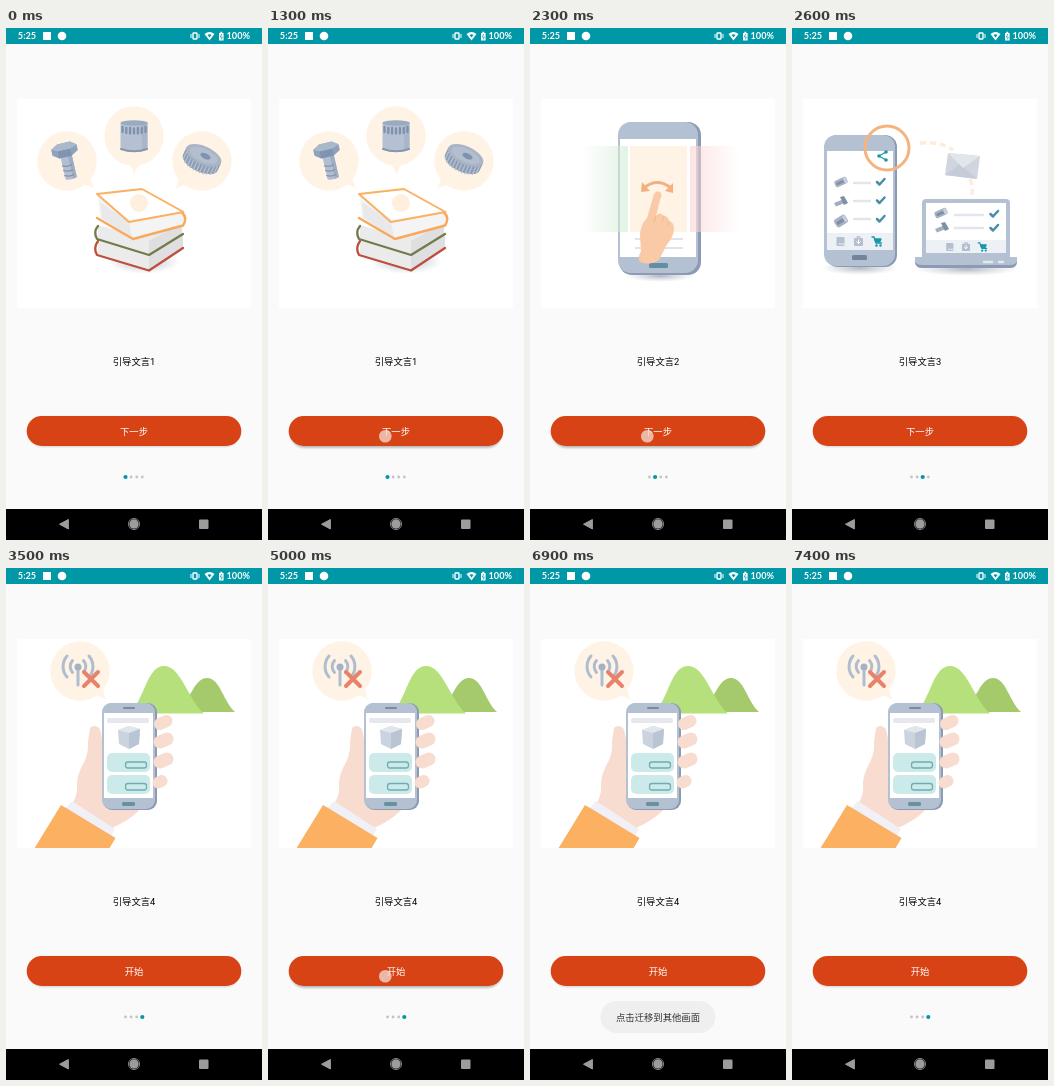
An HTML page for the animation above (7.5 s loop, 256 px wide and 512 px high).

```html
<!DOCTYPE html>
<html lang="zh-CN">
<head>
<meta charset="utf-8">
<title>引导页</title>
<style>
html, body { margin: 0; width: 100%; height: 100%; overflow: hidden; background: #fafafa; }
svg { display: block; width: 256px; height: 512px; }
text { font: 9.33px Roboto, "Noto Sans CJK SC", "Noto Sans CJK", sans-serif; text-anchor: middle; }
.status { font: 700 9.2px Lato, sans-serif; fill: #fff; }
#label { font-weight: 500; }
.cream { fill: #fff3e6; }
.body { fill: #b4c1d3; }
.side { fill: #8c9bb3; }
.skin { fill: #f7dccf; }
.line { fill: none; stroke-linecap: round; stroke-linejoin: round; }
</style>
</head>
<body>
<svg viewBox="0 0 256 512">
<defs>
  <linearGradient id="green"><stop stop-color="#d9eedb" stop-opacity="0"/><stop offset="1" stop-color="#d3ecd5" stop-opacity=".65"/></linearGradient>
  <linearGradient id="red"><stop stop-color="#fbd5d3" stop-opacity=".65"/><stop offset="1" stop-color="#fbdcda" stop-opacity="0"/></linearGradient>
  <radialGradient id="soft"><stop stop-color="#8f98a8" stop-opacity=".7"/><stop offset="1" stop-color="#b0b7c3" stop-opacity="0"/></radialGradient>
  <filter id="blur" x="-10%" y="-50%" width="120%" height="200%"><feGaussianBlur stdDeviation="1.2"/></filter>
  <path id="check" class="line" d="M-3.5 0L-1 2.5L4-3" stroke="#4a8cab" stroke-width="2.5"/>
  <g id="cart" class="line" stroke="#1798a8" stroke-width="1.3">
    <path d="M-5-4.5h2l2 6h5.5"/><path d="M-2.5-2.5h6.500l-1.300 3h-4z" fill="#1798a8"/>
    <circle cx="-.5" cy="4" r=".6"/><circle cx="3.500" cy="4" r=".6"/>
  </g>
  <g id="tabs" fill="#b4bfd0">
    <rect x="-22" y="-4.5" width="8" height="9" rx="1"/><path d="M-20 2.5h6" stroke="#edf0f5"/>
    <rect x="-4.5" y="-3.5" width="9" height="8" rx="1"/><path d="M-2-4.5h4" stroke="#b4bfd0" stroke-width="1.5"/>
    <path d="M0-2v4M-2 0L0 2L2 0" fill="none" stroke="#fff"/>
    <use href="#cart" x="18.5"/>
  </g>
  <g id="part">
    <rect x="-6.5" y="-3.5" width="13" height="7" rx="2" fill="#a6b2c4"/>
    <rect x="-5" y="-1" width="9" height="2.5" rx="1" fill="#7e8fa7"/>
    <ellipse cx="4.5" cy="0" rx="1.7" ry="3" fill="#c7d0dc"/>
  </g>
  <g id="screw"><path d="M-7 2L3-2L5 1.500L-5 5.500z" fill="#a3afc1"/><path d="M-1-4L3-5L7 2L3 4z" fill="#7e8fa7"/></g>
  <rect id="card" width="234" height="209" x="11" y="71" fill="#fff"/>
  <g id="bubble" class="cream"><circle r="29.7"/><path d="M-7 25Q0 34 0 39Q2 34 7 25z"/></g>
  <clipPath id="cardClip"><use href="#card"/></clipPath>
</defs>

<rect width="256" height="512" fill="#fafafa"/>

<g id="pages">
  <g>
    <use href="#card"/>
    <use href="#bubble" transform="translate(61 133) rotate(-44)"/>
    <use href="#bubble" transform="translate(128 108)"/>
    <use href="#bubble" transform="translate(196 133) rotate(44)"/>
    <g transform="translate(58.5 122) rotate(-13)">
      <path d="M-5.500 4h11.500v25q-6 2.500-11.500 0z" fill="#b3bfd0"/><path d="M2 5h4v24l-4 1z" fill="#9dadc2"/>
      <path class="line" d="M-5.500 15q5 2.500 9 1M-5.500 20q5 2.500 9 1M-5.500 25q5 2.500 9 1" stroke="#8194ad" stroke-width="1.3"/>
      <path d="M-13-3L-6-7H7L13-3V3L6 7H-7L-13 3z" fill="#8fa2bb"/>
      <path d="M-13-3L-6-7H7L13-3L6 0H-7z" fill="#a9b8cb"/><path d="M-7 0H6V7H-7z" fill="#7f94b1"/>
    </g>
    <path d="M114.500 95.500q13.500-5 27 0v26q-13.500 5-27 0z" fill="#b5c1d2"/>
    <path d="M136 94h5.500v27.500l-5.500 2z" fill="#a9b6c9"/>
    <ellipse cx="128" cy="95" rx="13.500" ry="2.700" fill="#9aabc1"/>
    <path class="line" d="M116.500 99v5M120.300 100v5M124.100 100v5.500M128 100.500v5M131.900 100v5.500M135.700 100v5M139.500 99v5" stroke="#7d91ac" stroke-width="2.300"/>
    <path class="line" d="M115 121q13 4.500 26 0" stroke="#8597b0" stroke-width="2"/>
    <g transform="translate(196 131) rotate(25)">
      <path d="M-19-4v8a19 9 0 0 0 38 0v-8z" fill="#8c9db5"/>
      <path d="M-17 0v8M-14 2v9M-10.500 3.500v9M-7 4.500v9M-3.500 5v9M0 5v9M3.500 5v9M7 4.500v9M10.500 3.500v9M14 2v9M17 0v8" stroke="#b9c4d2" stroke-width="1.200"/>
      <ellipse cy="-4" rx="19" ry="9" fill="#a9b5c6"/><ellipse cy="-4" rx="15" ry="6.500" fill="#b3bfce"/>
      <ellipse cx="2" cy="-4" rx="5.500" ry="2.700" fill="#7f93ad"/>
    </g>
    <ellipse cx="138" cy="234" rx="36" ry="12" fill="url(#soft)"/>
    <path d="M92 212L143 227L177 206V220L143 242L92 227z" fill="#ebebec"/>
    <path d="M143 227L177 206V220L143 242z" fill="#dfdfe2"/>
    <path d="M92 197L130 208L176 196V206L143 226L92 211z" fill="#ebebec"/>
    <path d="M143 213L176 194V206L143 226z" fill="#dfdfe2"/>
    <g class="line" stroke-width="2.3">
      <path d="M92 213Q87 220 91 227L143 242.500L177 220" stroke="#bd4f3d"/>
      <path d="M92 198Q87 204 91 211L143 227L177 206" stroke="#737a4c"/>
    </g>
    <path d="M92 168L124 192L178 184V197L127 211L94 190z" fill="#f4f4f5"/>
    <path d="M94 174L123 194L126 210L96 190z" fill="#e9e9eb"/>
    <path class="line" d="M91 190L127 211L177 197.500Q182 190 176 184.500" stroke="#f8a95c" stroke-width="2.500"/>
    <path class="line" d="M91 166L136 161L177.500 184L123 194z" fill="#fbb062" stroke="#fbb062" stroke-width="2"/>
    <circle cx="133" cy="175" r="9" fill="#fff0dd"/>
    <text x="128" y="337">引导文言1</text>
  </g>

  <g>
    <use href="#card"/>
    <g transform="translate(-2)">
      <ellipse cx="132" cy="248" rx="34" ry="6" fill="url(#soft)"/>
      <rect class="side" x="91" y="94" width="82" height="153" rx="13"/>
      <rect class="body" x="90" y="94" width="80" height="151" rx="13"/>
      <rect x="92" y="111" width="76" height="118" fill="#fff"/>
      <rect x="121" y="235" width="19" height="5" rx="1.5" fill="#628fa0"/>
      <rect class="cream" x="102" y="118" width="57" height="86"/>
      <rect x="53" y="118" width="47" height="86" fill="url(#green)"/>
      <rect x="162" y="118" width="50" height="86" fill="url(#red)"/>
      <path d="M107 211h48M107 220h48" stroke="#e2e3ea" stroke-width="2"/>
      <path class="line" d="M116 160Q129 149 143 160" stroke="#f3b083" stroke-width="3"/>
      <path d="M113 164L114 154L122 163zM145 165L137 163L145 155z" fill="#f3b083"/>
      <path d="M126 166Q129 161 133 165Q134 167 132 172L128 188Q132 183 136 188Q140 188 141 193Q146 194 146 201Q146 208 138 218L131 232Q122 238 112 234Q109 230 113 223L112 208Q112 197 119 190z" fill="#fac9a6"/>
      <path class="line" d="M128 188L126 194M136 188L134 193M141 193L140 197" stroke="#f4b78f"/>
    </g>
    <text x="128" y="337">引导文言2</text>
  </g>

  <g>
    <use href="#card"/>
    <ellipse cx="68" cy="240" rx="38" ry="7" fill="url(#soft)"/>
    <ellipse cx="174" cy="241" rx="52" ry="7" fill="url(#soft)"/>
    <rect class="side" x="34" y="107" width="71" height="132" rx="12"/>
    <rect class="body" x="32" y="107" width="71" height="131" rx="12"/>
    <rect x="35" y="123" width="66" height="99" fill="#fff"/>
    <rect x="60" y="227" width="15" height="5" rx="1.5" fill="#72839b"/>
    <rect x="35" y="205" width="66" height="17" fill="#edf0f5"/>
    <use href="#tabs" x="66.5" y="213.500"/>
    <path class="line" d="M62 155h16M62 173h16M62 191h16" stroke="#e4e5ec" stroke-width="2.5"/>
    <use href="#part" transform="translate(49 154) rotate(-24)"/>
    <use href="#screw" x="49" y="173"/>
    <use href="#part" transform="translate(49 193) rotate(-32) scale(1 1.300)"/>
    <use href="#check" x="88.5" y="154"/><use href="#check" x="88.5" y="172.500"/><use href="#check" x="88.5" y="191"/>
    <circle cx="95" cy="120" r="22" fill="none" stroke="#f5b37d" stroke-width="3"/>
    <path class="line" d="M94 124L87 128L94 132" stroke="#1798a8" stroke-width="1.200"/>
    <g fill="#1798a8"><circle cx="94" cy="124" r="1.800"/><circle cx="87" cy="128" r="1.800"/><circle cx="94" cy="132" r="1.800"/></g>
    <path d="M128 115Q148 113 161 122M178 151Q181 159 180 167" fill="none" stroke="#fdebdb" stroke-width="3.500" stroke-dasharray="6 4"/>
    <path d="M156 125L188 128L185 151L153 147z" fill="#d0d5de"/>
    <path d="M153 147L168 136L185 151z" fill="#c6ccd7"/>
    <path d="M156 125L188 128L171 140z" fill="#e2e5eb"/>
    <rect class="body" x="130" y="171" width="88" height="61" rx="4"/>
    <rect x="134" y="175" width="80" height="50" fill="#fff"/>
    <rect x="134" y="212" width="80" height="13" fill="#edf0f5"/>
    <use href="#tabs" transform="translate(174 219) scale(.9)"/>
    <path class="line" d="M163 187h28M163 200h28" stroke="#e4e5ec" stroke-width="2.5"/>
    <use href="#part" transform="translate(149 185) rotate(-24)"/>
    <use href="#screw" x="150" y="199"/>
    <use href="#check" x="202" y="186"/><use href="#check" x="202" y="200"/>
    <path class="side" d="M123 232h102v3q-1 5-7 5h-88q-6 0-7-5z"/>
    <path class="body" d="M123 229h102v4q-1 4-7 4h-88q-6 0-7-4z"/>
    <path class="line" d="M192 234h8M207 234h4" stroke="#e4e9f0" stroke-width="2.5"/>
    <text x="128" y="337">引导文言3</text>
  </g>

  <g>
    <use href="#card"/>
    <g clip-path="url(#cardClip)">
      <path d="M172 144C184 133 188 110 201 110S217 133 229 144z" fill="#a4ca6c"/>
      <path d="M124 145.500C139 130 141 98 158 98S181 130 198 145.500z" fill="#b6e07b"/>
      <use href="#bubble" transform="translate(74 103) rotate(-42)"/>
      <g class="line" stroke="#b0bdcf" stroke-width="3">
        <path d="M72 100v17"/>
        <path d="M66.500 92.500a9 9 0 0 0 0 12M77.500 92.500a9 9 0 0 1 0 12M61 88a16 16 0 0 0 0 21M83 88a16 16 0 0 1 0 21"/>
      </g>
      <circle cx="72" cy="99" r="3.500" fill="#a3b2c6"/>
      <path class="line" d="M78 104L92 118M92 104L78 118" stroke="#e8826b" stroke-width="4"/>
      <path class="skin" d="M84 160Q88 156 93 160Q96 164 97 184L104 230L135 240Q126 251 106 260L66 236Q72 228 71 216Q71 208 76 198Q83 186 82 174Z"/>
      <rect class="side" x="97" y="135" width="54" height="107" rx="9"/>
      <rect class="body" x="96" y="135" width="53" height="106" rx="9"/>
      <rect x="98" y="145" width="49" height="85" fill="#fff"/>
      <rect x="117" y="139" width="12" height="2" rx="1" fill="#788ba2"/>
      <rect x="116" y="234" width="13" height="4" rx="1.5" fill="#67919b"/>
      <rect x="101" y="150" width="42" height="5" rx="2" fill="#e7e8ee"/>
      <path d="M112 162L123 158L134 161L133 176L123 181L113 176z" fill="#cbd3df"/>
      <path d="M112 162L123 158L134 161L123 165z" fill="#e1e6ed"/><path d="M123 165L134 161L133 176L123 181z" fill="#bac5d3"/>
      <rect x="101" y="185" width="43" height="19" rx="5" fill="#cdeaea"/>
      <rect x="101" y="207" width="43" height="19" rx="5" fill="#cdeaea"/>
      <g fill="none" stroke="#70adb0" stroke-width="1.300"><rect x="119.500" y="194" width="21" height="6" rx="2.5"/><rect x="119.500" y="215.500" width="21" height="6.500" rx="2.5"/></g>
      <g class="line" stroke="#f7dccf">
        <path d="M154 156L160.500 153" stroke-width="12"/><path d="M154 174L161 171" stroke-width="13"/>
        <path d="M154 194L161 191" stroke-width="13"/><path d="M152.500 214.500L155.500 213" stroke-width="12"/>
      </g>
      <path d="M66 233L109 261L104 270L59 241z" fill="#f2f0f7"/>
      <path d="M59 240L104 268" stroke="#dedfe9" stroke-width="1.5"/>
      <path d="M55 237L109.500 270L103 281H28z" fill="#fbb062"/>
    </g>
    <text x="128" y="337">引导文言4</text>
  </g>
</g>

<rect id="shade" x="22" y="388" width="212" height="30" rx="15" filter="url(#blur)"/>
<rect x="20.700" y="388" width="214.600" height="30" rx="15" fill="#d84315"/>
<text id="label" x="128" y="406.700" fill="#fff"></text>
<g id="dots"></g>
<g id="toast">
  <rect x="70.500" y="433" width="115" height="32" rx="16" fill="#eeeeef"/>
  <text x="128" y="452.700" fill="#222">点击迁移到其他画面</text>
</g>
<circle id="touch" cx="117.300" cy="408.300" r="6.300" fill="#f3dfd6"/>

<rect width="256" height="16" fill="#0097a7"/>
<text class="status" x="21" y="11.300">5:25</text>
<rect x="37" y="4" width="8" height="8" fill="#fff"/>
<circle cx="56" cy="8" r="4.300" fill="#fff"/>
<g fill="none" stroke="#fff"><rect x="187" y="5" width="4" height="6" rx=".7" stroke-width="1.400"/><path d="M185 6v4M193 6v4"/></g>
<path d="M198.500 6Q203.500 2 208.500 6L203.500 12.500z" fill="#fff"/>
<path d="M201.500 7Q203.500 5.500 205.500 7L203.500 9.500z" fill="#0097a7"/>
<path d="M213 5h1.300V3.700h2V5h1.300v7.500H213z" fill="#fff"/><path d="M215.700 6L214.300 9h2l-1 2.500" fill="none" stroke="#0097a7" stroke-width=".7"/>
<text class="status" x="232.300" y="11.300">100%</text>

<rect y="481" width="256" height="31" fill="#000"/>
<g fill="#9c9c9c">
  <path d="M62.400 491.500V501L53.500 496.200z" stroke="#9c9c9c" stroke-linejoin="round"/>
  <circle cx="128" cy="496" r="4.700"/><circle cx="128" cy="496" r="5.600" fill="none" stroke="#9c9c9c" stroke-width=".8"/>
  <rect x="193" y="491.500" width="9.500" height="9.500" rx="1"/>
</g>
</svg>
<script>
const LOOP = 7500, STEP = 100, WIDTH = 256, SLIDE = 200, FADE = 190;
const taps = [
  { down: 1300, up: 1376 }, { down: 2300, up: 2310 },
  { down: 3300, up: 3310 }, { down: 5000, up: 5010 }
];
const turns = taps.slice(0, 3);
const byId = id => document.getElementById(id);
const clamp = v => Math.max(0, Math.min(1, v));
const ramp = (t, from, to) => clamp((t - from) / (to - from));
const easeOut = v => 1 - (1 - v) ** 5;

const pages = [...byId('pages').children];
pages.forEach((page, i) => page.setAttribute('transform', `translate(${i * WIDTH})`));
const dots = pages.map((_, i) => {
  const dot = document.createElementNS('http://www.w3.org/2000/svg', 'circle');
  dot.setAttribute('cx', 119.5 + i * 5.6);
  dot.setAttribute('cy', 449);
  return byId('dots').appendChild(dot);
});

function draw(t) {
  const scroll = turns.reduce((sum, tap) => sum + easeOut(ramp(t, tap.up, tap.up + SLIDE)), 0);
  const current = turns.filter(tap => t >= tap.up).length;
  const press = Math.max(...taps.map(tap => t < tap.down ? 0 : 1 - ramp(t, tap.up, tap.up + FADE)));

  byId('pages').setAttribute('transform', `translate(${-scroll * WIDTH})`);
  byId('label').textContent = current === 3 ? '开始' : '下一步';
  dots.forEach((dot, i) => {
    dot.setAttribute('r', i === current ? 2.1 : 1.4);
    dot.setAttribute('fill', i === current ? '#0097a7' : '#c3c3c6');
  });
  byId('touch').setAttribute('opacity', press * 0.75);
  byId('shade').setAttribute('y', 388.8 + press);
  byId('shade').setAttribute('opacity', 0.18 + press * 0.1);
  byId('toast').setAttribute('opacity', ramp(t, 5050, 5500) * (1 - ramp(t, 6850, 7400)));
}

const start = performance.now();
function tick() {
  const t = (performance.now() - start) % LOOP;
  draw(Math.floor(t / STEP) * STEP);
  requestAnimationFrame(tick);
}
tick();
</script>
</body>
</html>
```
